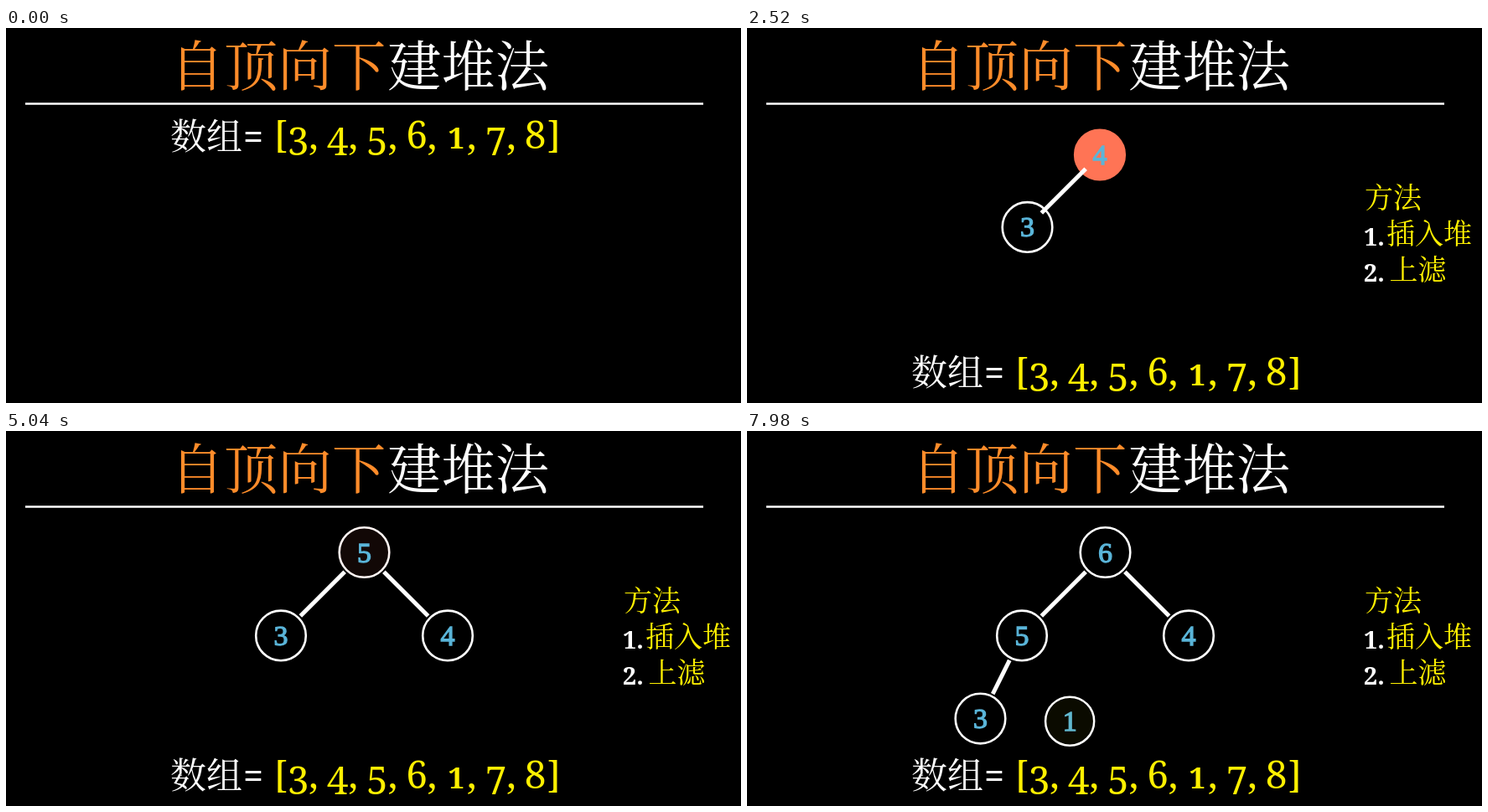
An HTML page that plays this animation: 877x448 px, repeating every 8000 ms.

```html
<!DOCTYPE html>
<html lang="zh">
<head>
<meta charset="utf-8">
<style>
  html, body { margin: 0; width: 100%; height: 100%; overflow: hidden; background: #000; }
  svg { display: block; }
  .han { font-family: "Noto Serif CJK SC", "Noto Sans CJK SC", "Noto Sans CJK", serif; font-weight: 300; }
  .num { font-family: "Noto Serif", "DejaVu Serif", serif; }
  .bold { font-weight: bold; }
  .node { font: 34px "Liberation Serif", serif; stroke-width: 1.3; text-anchor: middle; }
</style>
</head>
<body>
<script>
const LOOP = 8000, STEP = 60;
const WHITE = [255, 255, 255], YELLOW = [255, 240, 0], ORANGE = [255, 140, 42];
const BLUE = [90, 181, 217], RED = [255, 116, 85];
const RADIUS = 29.8, GAP = 33;
const INSERT = 270, EDGE = 130, LIGHT = 500, SWAP = 600;
const SLOTS = [[427.5, 145], [328, 244.4], [527, 244.4], [278.5, 343.6], [378, 343.6]];
const VALUES = [3, 4, 5, 6, 1, 7, 8];

// moves: [start time, new slot]; lit: [fade in, fade out]; index: place in the array
const NODES = [
  { index: 0, born: 896, slot: 0, moves: [[2066, 1], [6066, 3]] },
  { index: 1, born: 1166, slot: 1, moves: [[2066, 0], [4066, 2]], lit: [1566, 2666] },
  { index: 2, born: 3166, slot: 2, moves: [[4066, 0], [6666, 1]], lit: [3566, 4666] },
  { index: 3, born: 5166, slot: 3, moves: [[6066, 1], [6666, 0]], lit: [5566, 7266] },
  { index: 4, born: 7766, slot: 4, moves: [] }
];
const EDGES = [
  { from: 0, to: 1, born: 1436 },
  { from: 0, to: 2, born: 3436 },
  { from: 1, to: 3, born: 5436 }
];

const rgb = c => `rgb(${c.map(Math.round)})`;
const lerp = (a, b, s) => a + (b - a) * s;
const mix = (a, b, s) => a.map((v, i) => lerp(v, b[i], s));
const sigmoid = x => 1 / (1 + Math.exp(-x));

function smooth(x) {
  const low = sigmoid(-5);
  return (sigmoid(10 * (x - 0.5)) - low) / (1 - 2 * low);
}
const progress = (t, start, length) => smooth(Math.min(1, Math.max(0, (t - start) / length)));

function add(parent, tag, attrs, text) {
  const el = document.createElementNS("http://www.w3.org/2000/svg", tag);
  set(el, attrs);
  if (text !== undefined) el.textContent = text;
  return parent.appendChild(el);
}
function set(el, attrs) {
  for (const key in attrs) el.setAttribute(key, attrs[key]);
}
const write = (parent, cls, x, y, size, color, text, more) =>
  add(parent, "text", { class: cls, x, y, "font-size": size, fill: rgb(color), ...more }, text);

const svg = add(document.body, "svg", { width: 877, height: 448, viewBox: "0 0 877 448" });

// Title
write(svg, "han", 196, 68.5, 64.3, ORANGE, "自顶向下");
write(svg, "han", 455.2, 68.5, 64.3, WHITE, "建堆法");
add(svg, "path", { d: "M23 90.5H832", stroke: "#fff", "stroke-width": 2.6 });

// Array line, with old-style figures: some hang below the baseline, 1 is short
const array = add(svg, "g", {});
const digitX = i => 348.5 + 47.2 * i;
const middle = { "text-anchor": "middle" };
write(array, "han", 196, 144.7, 43, WHITE, "数组");
write(array, "num bold", 295, 145.5, 43, WHITE, "=", middle);
write(array, "num", 328, 143, 44, YELLOW, "[", middle);
VALUES.forEach((v, i) => {
  const short = v === 1;
  const hangs = [3, 4, 5, 7].includes(v);
  write(array, short ? "num bold" : "num", digitX(i), hangs ? 151.5 : 144.3,
    short ? 35 : 46, YELLOW, v, middle);
  if (i < VALUES.length - 1) write(array, "num", digitX(i) + 18.5, 144.5, 46, YELLOW, ",", middle);
});
write(array, "num", 654, 143, 44, YELLOW, "]", middle);

// Method notes
const notes = [["", "方法", 737, 215], ["1.", "插入堆", 763, 258], ["2.", "上滤", 766.5, 301]]
  .map(([mark, text, x, y]) => {
    const g = add(svg, "g", {});
    write(g, "num bold", 736, y + 2, 29, WHITE, mark);
    write(g, "han", x, y, 34, YELLOW, text);
    return g;
  });

for (const n of NODES) {
  n.group = add(svg, "g", {});
  n.disc = add(n.group, "circle", {});
  n.label = add(n.group, "text", { class: "node", y: 11.5 }, VALUES[n.index]);
}
for (const e of EDGES) {
  const [a, b] = [SLOTS[e.from], SLOTS[e.to]];
  const part = GAP / Math.hypot(b[0] - a[0], b[1] - a[1]);
  e.start = mix(a, b, part);
  e.end = mix(a, b, 1 - part);
  e.line = add(svg, "path", { stroke: "#fff", "stroke-width": 5 });
}

function drawNode(n, t) {
  n.group.style.display = t < n.born ? "none" : "";
  const grown = progress(t, n.born, INSERT);
  let at = mix([digitX(n.index), 413], SLOTS[n.slot], grown);
  for (const [start, slot] of n.moves) at = mix(at, SLOTS[slot], progress(t, start, SWAP));
  const lit = n.lit ? progress(t, n.lit[0], LIGHT) - progress(t, n.lit[1], LIGHT) : 0;
  const growing = grown < 1;
  const ink = rgb(mix(YELLOW, BLUE, grown));
  set(n.group, { transform: `translate(${at})` });
  set(n.disc, {
    r: lerp(13, RADIUS, grown),
    fill: rgb(growing ? YELLOW : RED),
    "fill-opacity": growing ? 1 - grown : lit,
    stroke: rgb(mix(WHITE, RED, lit)),
    "stroke-width": 2.6 * grown
  });
  set(n.label, { fill: ink, stroke: ink });
}

function draw(t) {
  set(array, { transform: `translate(0 ${282.5 * progress(t, 0, 500)})` });
  notes.forEach((g, i) => set(g, { opacity: progress(t, 450 + 110 * i, 230) }));
  for (const n of NODES) drawNode(n, t);
  for (const e of EDGES) {
    e.line.style.display = t < e.born ? "none" : "";
    set(e.line, { d: `M${e.start}L${mix(e.start, e.end, progress(t, e.born, EDGE))}` });
  }
}

const origin = performance.now();
function tick() {
  const t = Math.max(0, performance.now() - origin) % LOOP;
  draw(Math.floor(t / STEP) * STEP);
  requestAnimationFrame(tick);
}
tick();
</script>
</body>
</html>
```
